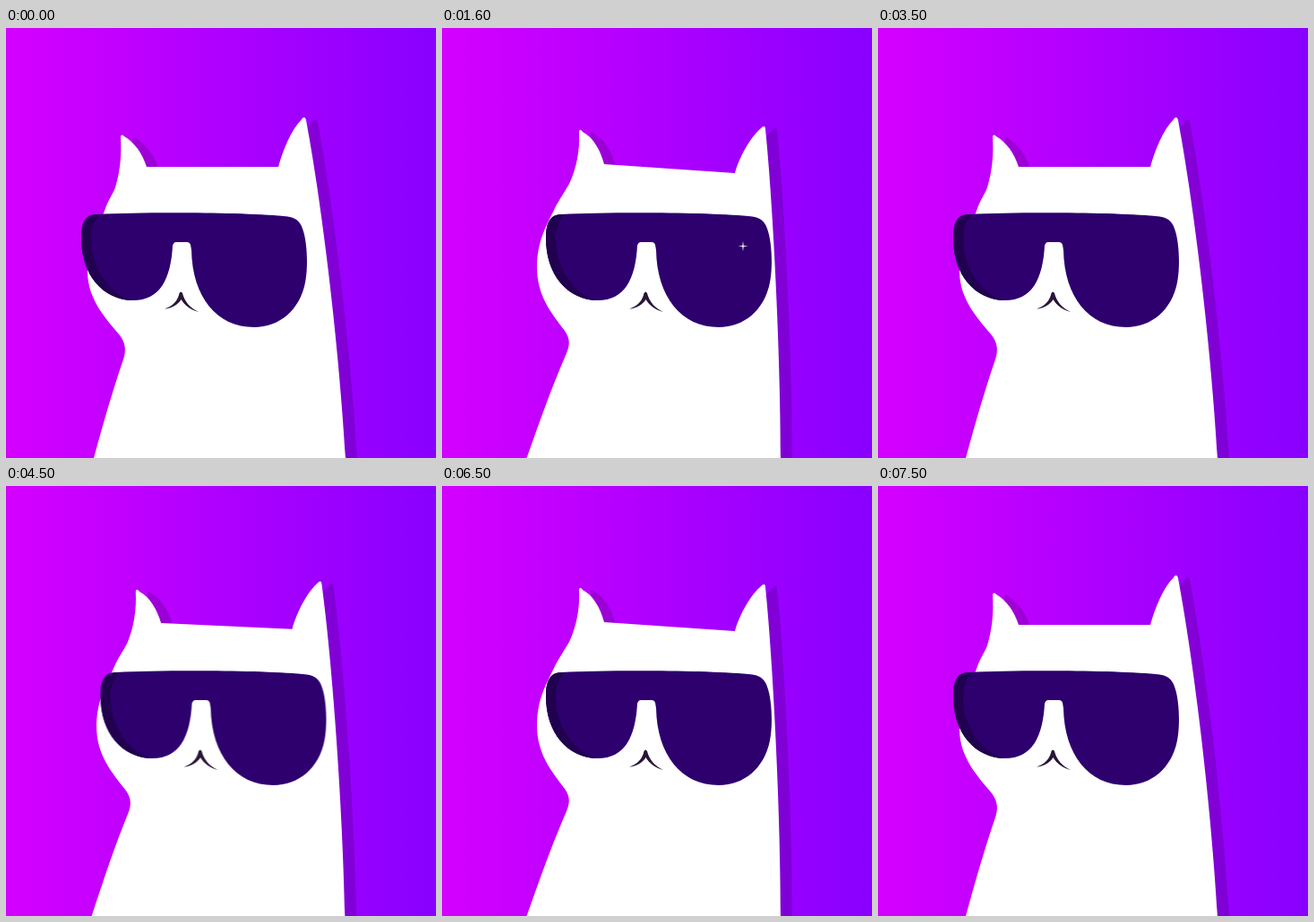
These frames come from a looping animation (480 px wide and 480 px high, 8000 ms). An HTML page without scripts:

```html
<!DOCTYPE html>
<html lang="en">
<head>
<meta charset="utf-8">
<title>Cool cat</title>
<style>
  html, body { margin: 0; width: 100%; height: 100%; overflow: hidden; background: #aa00ff; }
  svg { display: block; width: 100vw; height: 100vh; }

  .cat {
    --left: path("M98 480 C110 436 120 402 131 370 C134 361 134 352 127 343 C112 325 91 303 91 272 C91 240 104 220 110 204 C114 192 119 186 122 178 C128 158 129 140 128 122 C128 119 130 119 132 121 C144 128 152 140 157 155 L304 155 C309 137 318 114 330 102 C332 99 334 99 335 103 C354 205 372 360 379 480 Z");
    --right: path("M94.5 480 C110 437 122 402 139 363 C143 353 143 347 137 338 C122 318 106 299 106 267 C106 237 118 218 126 201 C130 193 138 181 142 174 C150 157 154 137 153 117 C153 113 155 113 157 116 C169 122 177 137 181 152 L327 162 C332 144 344 122 357 111 C359 109 361 109 361 113 C369 190 378 360 378 480 Z");
    d: var(--left);
    animation: turn 8s ease-in-out infinite;
  }
  .shadow { fill: #000; opacity: .16; transform: translate(13px, 2px); }
  .face { animation: slide 8s ease-in-out infinite; }
  .glint { animation: glint 8s linear infinite; }

  /* both share the same beat: look right, back, right, back */
  @keyframes turn {
    0%, .625%, 43.75%, 52.5%, 93.75%, 100% { d: var(--left); }
    11.25%, 36.25%, 58.75%, 86.25% { d: var(--right); }
  }
  @keyframes slide {
    0%, .625%, 43.75%, 52.5%, 93.75%, 100% { transform: translateX(0); }
    11.25%, 36.25%, 58.75%, 86.25% { transform: translateX(32px); }
  }
  @keyframes glint {
    0%, 15%, 27.5%, 61.25%, 73.75%, 100% { transform: scale(0); }
    21.25%, 67.5% { transform: scale(1); }
  }
</style>
</head>
<body>
<svg viewBox="0 0 480 480" preserveAspectRatio="none">
  <defs>
    <linearGradient id="sky">
      <stop offset="0" stop-color="#d500ff"/>
      <stop offset="1" stop-color="#8800ff"/>
    </linearGradient>
  </defs>

  <rect width="480" height="480" fill="url(#sky)"/>
  <g class="shadow"><path class="cat"/></g>
  <path class="cat" fill="#fff"/>

  <g class="face">
    <!-- mouth -->
    <path fill="#2a1538" d="M177 313.5 C186 311 192 304 193.5 296 Q195 293 197 296 C199 305 206 313 215 317 C206 315 199 309 195.5 303 C192 309 185 313 177 313.5 Z"/>
    <!-- sunglasses -->
    <path fill="#2d006e" d="M102 208 C150 205.5 260 205.5 310 210 C323 211 328 215 331 224 C337 240 337 270 334 284 C328 315 305 334 277 334 C235 334 208 300 207 248 L206 242 Q205 239 202 239 L190 239 Q187 239 186 243 C184 280 172 304 142 304 C108 304 84 275 84 235 C84 218 88 208 102 208 Z"/>
    <path fill="#20004f" d="M102 208 C88 208 84 218 84 235 C84 275 108 304 142 304 C116 298 96 270 95 238 C95 224 98 213 106 208 Z"/>
    <g transform="translate(304 243.5)">
      <path class="glint" fill="#fff" d="M0 -7 L.9 -.9 L7 0 L.9 .9 L0 7 L-.9 .9 L-7 0 L-.9 -.9 Z"/>
    </g>
  </g>
</svg>
</body>
</html>
```
